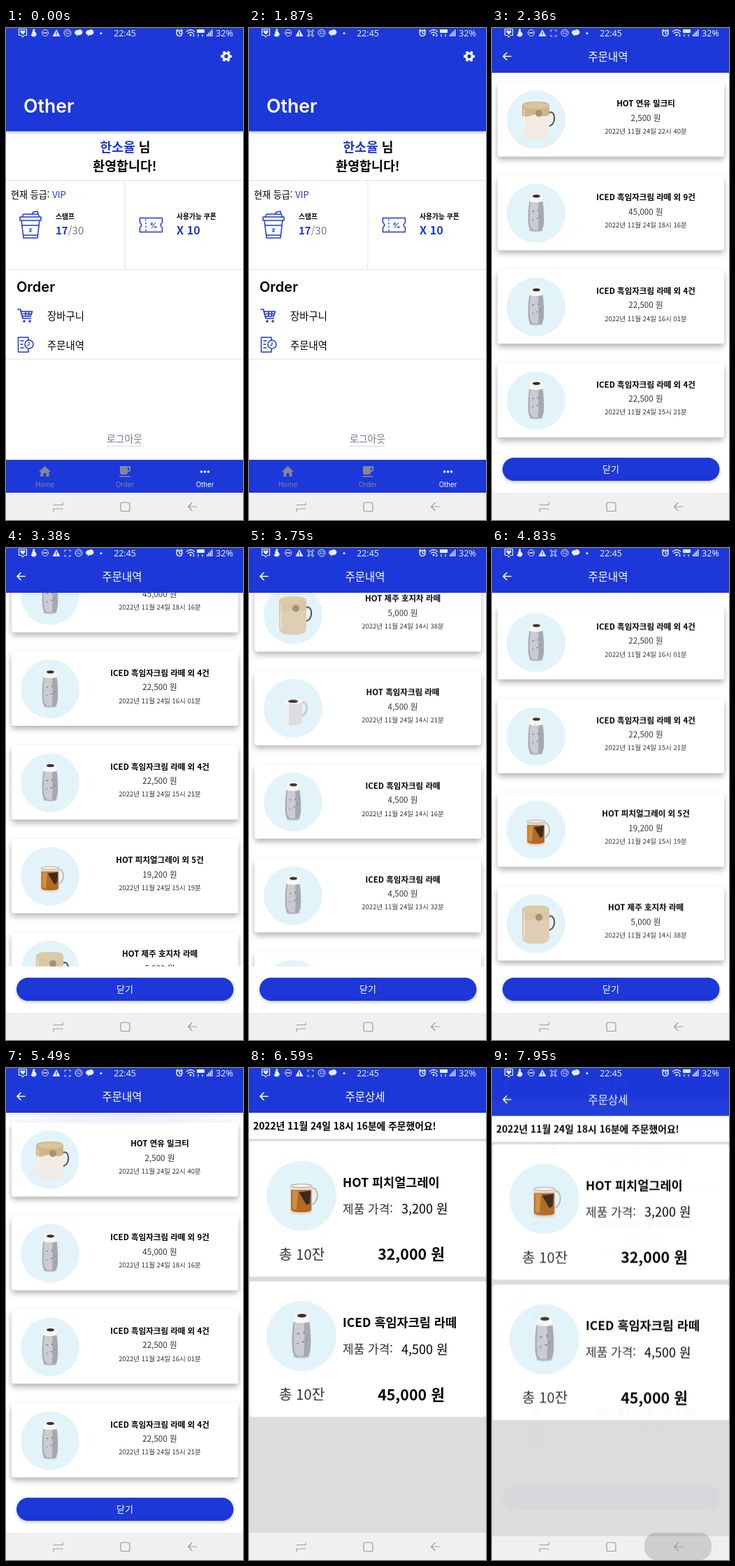
Animation, 339 px wide and 703 px high, one loop 8 s. Source, as an HTML page:

```html
<!DOCTYPE html>
<html lang="ko">
<head>
<meta charset="utf-8">
<title>주문내역</title>
<style>
  html, body { margin: 0; width: 100%; height: 100%; overflow: hidden; background: #fff; }
  svg { display: block; width: 339px; height: 703px; }
  text { font-family: "Noto Sans CJK KR", "Noto Sans KR", "Noto Sans CJK JP", "Noto Sans CJK", sans-serif; white-space: pre; }
  .latin { font-family: Inter, sans-serif; }
  .status { font-family: "Noto Sans", sans-serif; }
  .line { fill: none; stroke-linecap: round; stroke-linejoin: round; }
</style>
</head>
<body>
<svg id="stage" viewBox="0 0 339 703" xmlns="http://www.w3.org/2000/svg"></svg>
<script>
const LOOP = 8000, BLUE = '#1c38d8', PITCH = 133.8;
const HOLD = 'steps(1, end)';

// Text placed by the vertical centre of its glyphs
const text = (x, cy, s, size, { w = 400, fill = '#000', a = 'start', c = '' } = {}) =>
  `<text x="${x}" y="${(cy + size * .37).toFixed(2)}" font-size="${size}" font-weight="${w}" fill="${fill}" text-anchor="${a}" class="${c}">${s}</text>`;
const mid = (x, cy, s, size, o = {}) => text(x, cy, s, size, { ...o, a: 'middle' });
const rect = (x, y, w, h, fill, extra = '') =>
  `<rect x="${x}" y="${y}" width="${w}" height="${h}" fill="${fill}" ${extra}/>`;
const line = (d, color, w = 1.5, extra = '') =>
  `<path class="line" d="${d}" stroke="${color}" stroke-width="${w}" ${extra}/>`;
const shape = (d, fill, extra = '') => `<path d="${d}" fill="${fill}" ${extra}/>`;
const dot = (x, y, r, fill, extra = '') => `<circle cx="${x}" cy="${y}" r="${r}" fill="${fill}" ${extra}/>`;
const oval = (x, y, rx, ry, fill, extra = '') =>
  `<ellipse cx="${x}" cy="${y}" rx="${rx}" ry="${ry}" fill="${fill}" ${extra}/>`;

// Thin strokes of the small print
const LIGHT = { w: 300, fill: '#333' };

// Drinks are drawn around the centre of their pale disc (radius 42)
const wideMug = (foam, body) =>
  line('M18-10C29-15 29 9 18 9', '#5d4844', 2) +
  shape('M-20-20V20Q-19 28-8 28.500H7Q18 28 19 20V-20Z', body) +
  shape('M-20-20Q-19-26 0-26T19-20V-7Q11-3 6-6T-7-6T-20-6Z', foam) +
  oval(0, -20, 18, 4.5, '#e3d0ab', 'opacity=".6"') +
  dot(4, -9, 5, '#a69373') +
  line('M-17-15V20', '#fff', 1.5, 'opacity=".5"');

const drinks = {
  milktea: wideMug('#ceb488', '#f0ebe3'),
  hojicha: wideMug('#d9c6a4', '#dfcdb4'),
  iced:
    oval(0, 24, 10, 2.5, '#bcc5ca') +
    shape('M-9.500-18Q-12 0-11 15Q-10 24-6 25H6Q10 24 11 15Q12 0 9.500-18Z', '#a6a8b0') +
    shape('M-8-17Q-10 0-9 15Q-8 22-4 24H3Q4 0 3-17Z', '#cbccd2') +
    shape('M-8-26Q0-31 8.500-26L10-17Q0-14-10-17Z', '#f8f6f4') +
    oval(0.5, -24.5, 5.5, 2.2, '#38312f') +
    line('M-5-3h2M3-5v2M6 4h1M-5 9h1M1 7h2', '#777b88', 1.2),
  tea:
    line('M12-9C21-12 22 8 12 11', '#b8b3ac', 1.6) +
    shape('M-13.500-12H13V20Q12 23 0 23T-13.500 20Z', '#e5ddd2') +
    shape('M-12.500-7H12V17Q11 20 0 20T-12.500 17Z', '#b06a22') +
    shape('M-11-6H-4L-6 17L-11 16Z', '#cf8f43') +
    shape('M-3-4L11-6L10 9L6 11Z', '#3b2a20') +
    oval(0, -12, 13, 2, '#f7f5f0', 'stroke="#a89b8c" stroke-width=".8"'),
  mug:
    line('M12-7C21-15 23 9 12 11', '#cfcdcb', 3) +
    shape('M-14-10V18Q-13 24 0 24T13 18V-10Z', '#dedcdc') +
    shape('M-14-10V18Q-13 22-6 23V-10Z', '#f0efef') +
    oval(0, -10, 13.5, 4, '#f8f6f4') + oval(0, -10, 7, 2.3, '#40362f')
};
const drink = (kind, x, y, k = 1) =>
  `<g transform="translate(${x} ${y}) scale(${k})">${dot(0, 0, 42, '#e3f3fa')}${drinks[kind]}</g>`;

const orders = [
  ['milktea', 'HOT 연유 밀크티', '2,500', '22시 40분'],
  ['iced', 'ICED 흑임자크림 라떼 외 9건', '45,000', '18시 16분'],
  ['iced', 'ICED 흑임자크림 라떼 외 4건', '22,500', '16시 01분'],
  ['iced', 'ICED 흑임자크림 라떼 외 4건', '22,500', '15시 21분'],
  ['tea', 'HOT 피치얼그레이 외 5건', '19,200', '15시 19분'],
  ['hojicha', 'HOT 제주 호지차 라떼', '5,000', '14시 38분'],
  ['mug', 'HOT 흑임자크림 라떼', '4,500', '14시 21분'],
  ['iced', 'ICED 흑임자크림 라떼', '4,500', '14시 16분'],
  ['iced', 'ICED 흑임자크림 라떼', '4,500', '13시 32분'],
  ['tea', 'HOT 피치얼그레이', '3,200', '13시 29분'],
  ['iced', 'ICED 흑임자크림 라떼', '4,500', '13시 12분']
];

const orderCard = ([kind, name, price, time], i) => {
  const y = 78 + i * PITCH;
  return rect(8, y, 324, 105.5, '#fff', 'rx="4" filter="url(#lift)"') +
    drink(kind, 63, y + 53) +
    mid(220, y + 30, name, 11.5, { w: 700 }) +
    mid(220, y + 50.5, price + ' 원', 11.6, LIGHT) +
    mid(220, y + 69.5, '2022년 11월 24일 ' + time, 9.5, LIGHT);
};

const detailCard = (y, kind, name, price, total) =>
  rect(1, y, 338, 193.5, '#fff', 'rx="4"') +
  drink(kind, 75, y + 78, 1.19) +
  text(134, y + 59, name, 17.5, { w: 700 }) +
  text(134, y + 97, '제품 가격:', 17, LIGHT) +
  text(218, y + 97, price + ' 원', 18) +
  text(43, y + 162, '총 10잔', 20.2, LIGHT) +
  mid(232, y + 162, total + ' 원', 21.4, { w: 700 });

const topBar = title =>
  rect(0, 0, 339, 64, BLUE) +
  line('M27 40.500H16M21 35.500L16 40.500L21 45.500', '#fff', 1.7) +
  mid(166, 41, title, 15.5, { w: 500, fill: '#fff' });

const cupIcon = line('M22 275L25 300H45L48 275ZM20 270H50V275H20ZM23 270L25 266H46L48 270M37 266L39 263L45 262L46 266M23 282H47M24.500 296H45.500', BLUE) +
  mid(35, 289, '#', 7, { w: 700, fill: BLUE, c: 'latin' });
const couponIcon = line('M191.500 271.500H223.500V278Q219 281.500 223.500 285V291.500H191.500V285Q196 281.500 191.500 278Z', BLUE) +
  line('M200 273V291', BLUE, 1.2, 'stroke-dasharray="2 3"') +
  mid(211, 281.5, '%', 11, { w: 700, fill: BLUE, c: 'latin' });
const cartIcon = line('M17 402H20.500L24 415H35.500M22 405H37.500L35 412H23.500M24 408.500H36M28 405V412M32.500 405V412', BLUE, 1.7) +
  dot(26, 419, 1.8, BLUE) + dot(34, 419, 1.8, BLUE);
const receiptIcon = line('M32 446V442H17.500V463H32V459M21 447H25M21 452H24M21 457H25', BLUE) +
  dot(33, 452, 6, '#fff', `stroke="${BLUE}" stroke-width="1.5"`) +
  line('M33 448.500V452.500L30.500 454', BLUE, 1.2);
const gear =
  '<g fill="none" stroke="#fff"><circle cx="315" cy="40.500" r="4.400" stroke-width="3.400"/>' +
  '<circle cx="315" cy="40.500" r="6.700" stroke-width="2.600" stroke-dasharray="3.500 3.516" stroke-dashoffset="1.750"/></g>';

const GREY = '#858794', RULE = '#e2e2e2';
const home = `<g id="home">
  ${rect(0, 0, 339, 664, '#fff')}
  ${rect(0, 0, 339, 147.5, BLUE, 'filter="url(#soft)"')}
  ${gear}
  ${text(25, 111, 'Other', 26.6, { w: 600, fill: '#fff', c: 'latin' })}
  ${mid(170.5, 170, `<tspan fill="${BLUE}">한소율</tspan> 님`, 18.2, { w: 700 })}
  ${mid(170, 197, '환영합니다!', 18.4, { w: 700 })}
  ${rect(0, 217.5, 339, 1, RULE)}${rect(169.5, 218, 1, 127, RULE)}
  ${rect(0, 344.5, 339, 1, RULE)}${rect(0, 472.5, 339, 1, RULE)}
  ${text(7, 238, `현재 등급: <tspan fill="${BLUE}">VIP</tspan>`, 13.1)}
  ${cupIcon}${couponIcon}
  ${text(71, 269.5, '스탬프', 9.8, { w: 700 })}
  ${text(71, 289, `<tspan font-weight="700" fill="${BLUE}">17</tspan>/30`, 15, { fill: '#74788a' })}
  ${text(244, 269.5, '사용가능 쿠폰', 9.8, { w: 700 })}
  ${text(244, 289, 'X 10', 16.2, { w: 700, fill: BLUE })}
  ${text(15, 369.5, 'Order', 20, { w: 600, c: 'latin' })}
  ${cartIcon}${receiptIcon}
  ${text(59, 412, '장바구니', 14.4)}
  ${text(59, 454, '주문내역', 14.4)}
  ${mid(169.5, 587, '로그아웃', 13.9, { fill: '#74788a' })}
  ${rect(144, 597, 51, 1, '#d4d5dc')}
  ${rect(0, 617, 339, 47, BLUE)}
  ${shape('M55.500 626L64 634H61.500V641H57.500V636H53.500V641H49.500V634H47Z', GREY)}
  ${shape('M163 626H178V632Q178 634 175 634H174V635Q174 638 171 638H166Q163 638 163 635ZM174 628V632H176V628ZM162 640H177V641.500H162Z', GREY, 'fill-rule="evenodd"')}
  ${[279.5, 284.5, 289.5].map(x => dot(x, 634, 1.8, '#fff')).join('')}
  ${mid(55.5, 652, 'Home', 9.7, { fill: GREY, c: 'latin' })}
  ${mid(170, 652, 'Order', 9.7, { fill: GREY, c: 'latin' })}
  ${mid(284.5, 652, 'Other', 9.7, { fill: '#fff', c: 'latin' })}
</g>`;

const list = `<g id="list">
  ${rect(0, 0, 339, 664, '#fff')}
  <g clip-path="url(#listArea)">
    <g id="scroll">${orders.map(orderCard).join('')}</g>
    ${oval(170, 64, 230, 20, 'url(#fade)', 'id="glow"')}
  </g>
  ${topBar('주문내역')}
  ${rect(15, 614, 310.5, 33, BLUE, 'rx="16.500" filter="url(#soft)"')}
  ${mid(170, 630.5, '닫기', 13, { w: 500, fill: '#fff' })}
</g>`;

const detail = `<g id="detail">
  ${rect(0, 0, 339, 664, '#dcdcdc')}
  ${topBar('주문상세')}
  ${rect(0, 64, 339, 37, '#fff')}
  ${text(6, 83, '2022년 11월 24일 18시 16분에 주문했어요!', 13.8, { w: 700 })}
  ${detailCard(104.5, 'tea', 'HOT 피치얼그레이', '3,200', '32,000')}
  ${detailCard(305, 'iced', 'ICED 흑임자크림 라떼', '4,500', '45,000')}
</g>`;

const PALE = '#e9ecfb';
const blob = x => shape(`M${x - 6} 7Q${x - 6} 3 ${x - 1} 3Q${x + 1} 1 ${x + 4} 3Q${x + 7} 6 ${x + 4} 9Q${x + 1} 11 ${x - 1} 10L${x - 3} 12V10Q${x - 6} 9 ${x - 6} 7Z`, PALE);
const status = `<g>
  ${line('M18.500 1.500H29.500V10.500H26L24 13L22 10.500H18.500Z', PALE, 1.2)}
  ${shape('M24 9.500L20.500 6Q20 3 22.500 3L24 4.500L25.500 3Q28 3 27.500 6Z', PALE)}
  ${shape('M39 1Q42 1 41 5Q45 8 43 11Q40 14 36 11Q35 9 38 8Q36 6 38 5Z', PALE)}
  ${line('M53.500 7H58.500', PALE, 1.3)}${dot(56, 7, 4.5, 'none', `stroke="${PALE}"`)}
  ${shape('M72 2L77.500 12H66.500Z', PALE)}${rect(71.5, 5.5, 1.2, 3.5, BLUE)}${rect(71.5, 10, 1.2, 1, BLUE)}
  <g id="rec">
    ${line('M84 5V3H86M90 3H92V5M84 10V12H86M90 12H92V10', PALE, 1)}
    <g id="recDot">${rect(85.5, 5, 5, 5, 'none', `rx="1" stroke="${PALE}" stroke-width="1.2"`)}</g>
  </g>
  <g id="shift">
    ${dot(88, 7, 5, 'none', `stroke="${PALE}"`)}
    ${mid(88, 7, '32', 6.5, { fill: PALE, c: 'status' })}
    ${blob(104)}
  </g>
  <g id="extra">${blob(120)}</g>
  ${dot(136, 7.5, 1.5, PALE)}
  ${mid(170, 7.5, '22:45', 12.4, { fill: PALE, c: 'status' })}
  ${dot(248, 7.5, 4, 'none', `stroke="${PALE}" stroke-width="1.6"`)}
  ${line('M248 5V8H250M243.500 4L245.500 2M252.500 4L250.500 2', PALE, 1.3)}
  ${line('M258.500 5Q264 0 269.500 5M260.500 7.500Q264 4.500 267.500 7.500', PALE, 1.4)}${dot(264, 10, 1.5, PALE)}
  ${line('M268.500 8V12M267 10.500L268.500 12L270 10.500', PALE, .8)}
  ${rect(273, 2, 11, 5, PALE, 'rx="1"')}${line('M275 9V12M281 12V9', PALE, 1.2)}
  ${[0, 1, 2, 3].map(i => rect(287 + i * 2.3, 9 - i * 2.3, 1.5, 3 + i * 2.3, PALE)).join('')}
  ${text(300, 7.5, '32%', 12.6, { fill: PALE, c: 'status' })}
</g>`;

const NAV = '#9b9b9b';
const nav = rect(218, 664, 96, 39, '#000', 'id="press" rx="17"') +
  line('M81 681.500H68M81 681.500V678M68 687H81M68 687V690.500', NAV, 1.2) +
  rect(164, 678, 13, 12.5, 'none', `rx="2" stroke="${NAV}" stroke-width="1.200"`) +
  line('M273 684H260.500M266 678.500L260.500 684L266 689.500', NAV, 1.2);

const shadow = (id, dy, blur, alpha) =>
  `<filter id="${id}" x="-10%" y="-20%" width="120%" height="150%">
    <feDropShadow dx="0" dy="${dy}" stdDeviation="${blur}" flood-color="#000" flood-opacity="${alpha}"/>
  </filter>`;

document.getElementById('stage').innerHTML = `
  <defs>
    ${shadow('soft', 2, 2, .24)}${shadow('lift', 4.5, 4, .3)}
    <radialGradient id="fade"><stop offset=".2" stop-color="${BLUE}"/><stop offset="1" stop-color="${BLUE}" stop-opacity="0"/></radialGradient>
    <clipPath id="listArea"><rect y="64" width="339" height="533.500"/></clipPath>
  </defs>
  ${rect(0, 0, 339, 703, '#fff')}${rect(0, 664, 339, 39, '#f0f0f0')}
  ${home}${list}${detail}${status}${nav}`;

// rows: [ms, value, easing to the next row]
const play = (id, prop, rows) => {
  const full = [...rows, [LOOP, rows[rows.length - 1][1]]];
  document.getElementById(id).animate(
    full.map(([ms, v, easing = 'linear']) => ({ offset: ms / LOOP, [prop]: v, easing })),
    { duration: LOOP, iterations: Infinity });
};
const slide = (id, rows) =>
  play(id, 'transform', rows.map(([ms, y, e]) => [ms, `translateY(${y}px)`, e]));

const OUT = 'cubic-bezier(.2,.7,.3,1)', DRAG = 'cubic-bezier(.35,.1,.3,1)';

play('home', 'opacity', [[0, 1, HOLD], [2360, 0]]);
play('list', 'opacity', [[0, 0], [1980, 0], [2250, 1]]);
slide('list', [[0, 56], [1980, 56, OUT], [2340, 0], [6150, 0, OUT], [6500, -18]]);
slide('scroll', [[0, 0], [2720, 0, DRAG], [3360, -197], [3540, -197, OUT], [4140, -828],
  [4400, -828, OUT], [5140, -230], [5200, -230, OUT], [5450, 0]]);
play('glow', 'opacity', [[0, 0], [5380, 0], [5440, .14], [5600, 0]]);
play('detail', 'opacity', [[0, 0], [6150, 0], [6420, 1], [7880, 1], [7950, .975]]);
slide('detail', [[0, 56], [6150, 56, OUT], [6510, 0], [7880, 0], [7950, 4.5]]);
play('press', 'opacity', [[0, 0], [7840, 0], [7930, .14]]);

// The recording icon joins the status bar, then its centre blinks
play('rec', 'opacity', [[0, 0, HOLD], [550, 1]]);
play('extra', 'opacity', [[0, 1, HOLD], [550, 0]]);
play('shift', 'transform', [[0, 'translateX(0px)', HOLD], [550, 'translateX(16px)']]);
const blink = [[0, 0, HOLD]];
for (let ms = 550; ms < LOOP; ms += 1050) {
  blink.push([ms, 1, HOLD]);
  if (ms + 500 < LOOP) blink.push([ms + 500, 0, HOLD]);
}
play('recDot', 'opacity', blink);
</script>
</body>
</html>
```
